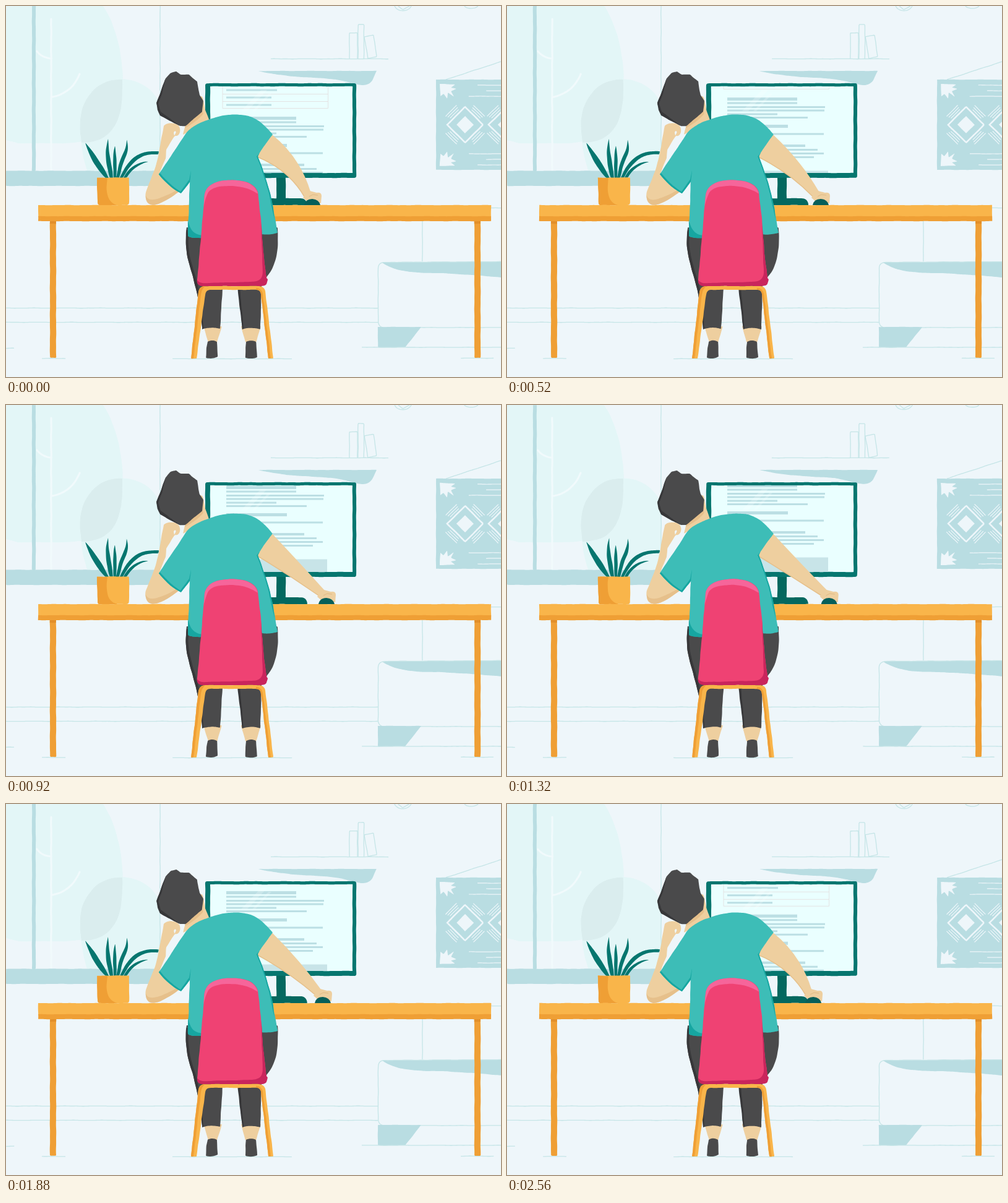
These frames come from a looping animation (800x600 px, 2.6 s). An HTML page:

```html
<!DOCTYPE html>
<html lang="en">
<head>
<meta charset="utf-8">
<title>At the desk</title>
<style>
html, body { margin: 0; width: 100%; height: 100%; overflow: hidden; background: #eef6fa; }
body > svg { display: block; width: 800px; height: 600px; }
.pale { fill: #b9dde2; }
.line { fill: none; stroke: #c5e5e7; stroke-width: 1.3; }
.white { fill: #eef6fa; }
.wline { fill: none; stroke: #eef6fa; stroke-width: 1.2; }
.branch { fill: none; stroke: #f1fafc; stroke-width: 3; stroke-linecap: round; }
.teal { fill: #06766f; }
.stand { fill: #04685f; }
.gold { fill: #f9b54a; }
.amber { fill: #ef9f35; }
.skin { fill: #eecf9f; }
.tan { fill: #e6c08b; }
.dark { fill: #4a4a4b; }
.black { fill: #373739; }
.shirt { fill: #3dbdb7; }
.shade { fill: #16a6a1; }
.pink { fill: #ef4273; }
</style>
</head>
<body>
<svg viewBox="0 0 800 600">
  <rect width="800" height="600" fill="#eef6fa"/>

  <g id="room">
    <path fill="#e3f6f7" d="M0 0H157C180 35 192 90 188 145C185 195 155 222 90 222H20L0 217Z"/>
    <path fill="#e3f6f7" d="M131 266C118 225 116 183 132 149C145 124 180 113 206 121C228 127 242 142 249 160V266Z"/>
    <path fill="#daedee" d="M122 221C116 180 122 160 136 143C148 125 168 118 188 119C189 165 183 188 168 204C158 215 145 220 122 221Z"/>
    <path class="branch" d="M73 21V266"/>
    <path class="branch" d="M50 73Q58 84 73 85"/>
    <path class="branch" d="M119 110C112 127 98 143 75 147"/>
    <path class="pale" d="M42 0H48V267H42Z"/>
    <path class="pale" d="M0 266.500H249V291H0Z"/>
    <path class="line" d="M249 0V267"/>

    <path class="line" d="M428 85.500H618"/>
    <path class="line" d="M555 85V43.500H568V85"/>
    <path class="line" d="M569 85V30H578.500V85"/>
    <path class="line" d="M579 50L594 47L599 82L585 85Z"/>
    <path class="pale" d="M408 105H599L592 120Q587 128 575 128C554 125 545 119 515 117C475 115 440 113 408 105Z"/>
    <path class="line" d="M628 0C632 10 650 10 655 0"/>
    <path class="line" d="M634 0L641 6L652 0"/>
    <path class="line" d="M741 0C745 5 759 5 763 0"/>

    <path class="line" d="M711 119L800 90"/>
    <path class="pale" d="M695 119H802V265H695Z"/>
    <g id="weave"></g>

    <path class="line" d="M784 326.500H800"/>
    <path class="line" d="M673 348V413"/>
    <path class="line" d="M0 488.500H601"/>
    <path class="line" d="M0 511.500H601"/>
    <path class="pale" d="M608 415C640 436 680 430 720 433C755 435 780 437 802 439V413Z"/>
    <path class="line" d="M802 413.500L612 414.500Q601 415 601.500 426V508Q601 520 613 520H802"/>
    <path class="pale" d="M601 519H671L645 552H601Z"/>
    <path class="line" d="M575 552H802"/>
    <path class="line" d="M0 553.500H13"/>
    <path class="line" d="M58 570H96"/>
    <path class="line" d="M269 570.500H462"/>
    <path class="line" d="M735 569.500H788"/>

    <path class="stand" d="M437 276H452V312H437Z"/>
    <path class="stand" d="M420 311H478Q486 312 487 322H420Z"/>
    <path class="teal" d="M325 125H563Q566 125 566 128V275Q566 278 563 278H325Q322 278 322 275V128Q322 125 325 125Z"/>
    <path fill="#eaffff" d="M330 130H560V270H330Z"/>
  </g>

  <svg x="330" y="130" width="230" height="140" viewBox="330 130 230 140">
    <g id="page"></g>
    <path fill="#fff" opacity=".2" d="M380 170L412 136H422L390 170ZM398 170L424 142H429L403 170Z"/>
  </svg>

  <g id="desk">
    <path class="teal" d="M166 278C155 255 141 235 128 221C134 241 144 262 161 278Z"/>
    <path class="teal" d="M173 278C171 255 166 240 165 215C159 235 161 257 168 278Z"/>
    <path class="teal" d="M178 278C179 258 179 242 176 226C172 243 173 260 174 278Z"/>
    <path class="teal" d="M178 278C181 265 181 257 186 246C191 235 195 228 195 216C198 225 198 235 193 245C188 255 186 266 183 278Z"/>
    <path class="teal" d="M184 278C196 250 210 233 247 235L246 240C219 238 203 251 189 278Z"/>
    <path class="teal" d="M190 278C197 263 211 251 230 252C214 256 203 264 195 278Z"/>
    <path class="gold" d="M147 277.500H199V318Q199 322 195 322H151Q148 322 148 318Z"/>
    <path class="amber" d="M147 278H164C161 300 162 317 180 322H151Q148 322 148 318Z"/>
    <path class="amber" d="M71 346H81V569H71Z"/>
    <path class="amber" d="M757 346H767V569H757Z"/>
    <path class="gold" d="M52 322H784V342H52Z"/>
    <path class="amber" d="M52 340H784V348H52Z"/>
    <path fill="#e28f2a" d="M71 348H81V352H71Z"/>
    <path fill="#e28f2a" d="M757 348H767V352H757Z"/>
  </g>

  <path id="arm" class="skin"/>
  <path id="under" fill="none" stroke="#e6c08b" stroke-width="1.500"/>
  <g id="hand">
    <path class="skin" d="M480 310L485 303L491 299L502 302Q510 301 510 307L509 319H490Z"/>
    <path fill="none" stroke="#e0b983" d="M490 308L496 305L504 306"/>
    <path fill="#075f59" d="M482 322Q484 312 495 312Q506 313 508 322Z"/>
  </g>

  <g id="man">
    <path class="skin" d="M255 194C261 187 279 188 281 198C283 205 278 212 273 210L269 216L259 232L258 246L248 270L280 300C266 310 253 319 243 321C231 324 223 313 226 300L239 268C245 252 249 226 252 210Z"/>
    <path class="tan" d="M226 306C230 320 250 312 277 297L280 300C266 310 253 319 243 321C231 324 225 317 226 306Z"/>
    <path fill="#eef6fa" d="M271 205Q273 200 275 204L272 210Z"/>
    <path class="skin" d="M311 148Q318 142 319 152L322 168L328 184L308 196L286 208L290 192Z"/>
    <path class="tan" d="M317 170L290 193L289 197Q308 188 319 174Z"/>
    <path class="dark" d="M275 106L282 111L296 111L300 115L309 122L311 136L313 144L319 153L317 171L290 194L281 194L261 183L250 177L246 168L243 157L249 142L254 127L258 117L266 108Z"/>
    <path class="black" d="M258 117L252 142L246 158L250 171L281 194L261 184L249 177L245 168L243 157L250 139Z"/>

    <path class="skin" d="M319 518H349L341 544H327Z"/>
    <path class="skin" d="M380 518H412L404 544H387Z"/>
    <path class="dark" d="M326 543Q333 539 341 543L342 567Q333 572 323 569L324 553Z"/>
    <path class="dark" d="M388 543Q396 539 404 543L406 568Q397 572 387 569L387 553Z"/>
    <path class="dark" d="M292 358C288 385 293 410 301 434C308 460 315 490 317 523Q332 518 346 522L351 440H374L382 523Q395 518 411 523L413 452L422 437C437 420 441 395 439 358Z"/>
    <path class="black" d="M292 362C288 385 293 410 301 434C308 460 315 490 317 523L319 522C317 485 311 450 304 430C296 405 293 385 295 362Z"/>
    <path class="black" d="M374 455L382 523L384 522L378 455Z"/>

    <path class="shirt" d="M290 207C298 196 312 189 327 184C345 176 375 173 392 178C410 183 421 197 431 208Q418 225 406 243C417 268 427 300 432 328L439 367Q425 371 411 369L320 375Q300 376 294 372L297 284L283 303Q262 292 247 272C258 255 272 235 290 207Z"/>
    <path class="shade" d="M247 272Q262 292 283 303L297 285L299 265L296 281L282 300Q264 289 249 270Z"/>
    <path class="shade" d="M294 345C297 362 304 371 320 371L319 375Q300 376 294 372Z"/>
    <path class="shade" d="M405 243C415 268 424 295 429 323L434 345L432 326C427 299 417 268 407 243L410 237Z"/>

    <path class="pink" d="M321 305Q325 283 362 281.500Q401 281 407 302L412 345L416 400L421 440V448Q420 452 410 452H317Q308 451 309 442L315 375Z"/>
    <path fill="#f6659a" d="M319 325L321 305Q325 283 362 281.500Q401 281 407 304Q386 290 359 291Q331 292 326 303Q321 315 319 325Z"/>
    <path fill="#c9255c" d="M412 349L416 400L421 440L423 442L421 449Q420 453 410 453H317Q308 452 309 443Q313 449 324 448L399 446Q414 445 415 431Z"/>
    <path class="gold" d="M311 462Q313 453 322 453H408Q417 453 419 461L432 570H424L412 466Q411 459 404 459H330Q323 459 322 466L308 570H299Z"/>
    <path class="amber" d="M311 462Q313 453 322 453Q316 458 315 466L303 570H299Z"/>
    <path class="amber" d="M404 456Q413 456 415 466L428 570H424L412 466Q411 459 404 459Z"/>
  </g>
</svg>

<script>
const LOOP = 2600, STEP = 40;
const $ = id => document.getElementById(id);

// wall hanging
const diamond = (x, r) => `M${x - r} 192L${x} ${192 - r}L${x + r} 192L${x} ${192 + r}Z`;
const path = (cls, d, more = '') => `<path class="${cls}" d="${d}" ${more}/>`;
let weave = '';
const corner = [[701, 126], [726, 127], [719, 132], [728, 134], [719, 138], [724, 147],
  [714, 140], [713, 150], [707, 142], [702, 146]];
for (const flip of [0, 1]) {
  const y = v => flip ? 385 - v : v;
  weave += path('white', 'M' + corner.map(p => p[0] + ' ' + y(p[1])).join('L') + 'Z');
  for (const [x, v] of [[762, 128], [776, 137], [748, 146]])
    weave += path('wline', `M${x} ${y(v)}H802`);
}
for (const x of [742, 809]) {
  weave += path('wline', diamond(x, 29), 'style="stroke-width:2.5"') + path('white', diamond(x, 14));
  // short strokes beside each edge of the diamond
  for (const r of [35, 40, 45])
    for (const sx of [-1, 1])
      for (const sy of [-1, 1]) {
        const at = u => `${x + sx * r * u} ${192 + sy * r * (1 - u)}`;
        weave += path('wline', `M${at(.3)}L${at(.7)}`);
      }
}
$('weave').innerHTML = weave;

// scrolling page: [y, right end, height]
const bars = [[136, 438, 3], [148, 429, 3], [160, 429, 3], [181.5, 469, 5], [188, 469, 3],
  [194.5, 514, 3], [200, 513, 3], [206, 437, 3], [211.5, 486, 3], [225.5, 454, 5],
  [238, 512, 3], [257, 482, 4], [263.5, 502, 3], [269.5, 512, 3], [275.5, 496, 3]];
$('page').innerHTML =
  bars.map(([y, x, h]) => `<rect x="356" y="${y - h / 2}" width="${x - 356}" height="${h}" fill="#bcdfe4"/>`).join('') +
  '<rect x="356" y="297.5" width="163" height="60" fill="#c8e4e8"/>' +
  '<path fill="none" stroke="#e3dcdc" stroke-width=".8" d="M350 120H520.5V165.5H350ZM350 142.5H520.5M350 154.5H520.5"/>';

// hand-drawn edges: sample every path once, then shift the points a little
const rough = ['room', 'desk', 'man'].flatMap(id => [...$(id).querySelectorAll('path')]).map(el => {
  const len = el.getTotalLength(), n = Math.ceil(len / 2), pts = [];
  for (let i = 0; i <= n; i++) {
    const p = el.getPointAtLength(len * i / n);
    pts.push([p.x, p.y]);
  }
  return { el, pts, end: /Z$/.test(el.getAttribute('d')) ? 'Z' : '' };
});

function wobble(k) {
  const a = k * 2.4, b = k * 4.1;
  for (const { el, pts, end } of rough) {
    el.setAttribute('d', 'M' + pts.map(([x, y]) => {
      const dx = .16 * Math.sin(y * .13 + x * .03 + a) + .1 * Math.sin(y * .31 - x * .07 + b);
      const dy = .16 * Math.sin(x * .12 - y * .04 + b) + .1 * Math.sin(x * .29 + y * .06 + a);
      return (x + dx).toFixed(2) + ' ' + (y + dy).toFixed(2);
    }).join('L') + end);
  }
}

// monotone curve through [time, value] keys, level at both ends
function curve(keys) {
  const slope = i => (keys[i + 1][1] - keys[i][1]) / (keys[i + 1][0] - keys[i][0]);
  const tan = keys.map((_, i) => {
    if (!i || i === keys.length - 1) return 0;
    const p = slope(i - 1), q = slope(i);
    return p * q > 0 ? 2 * p * q / (p + q) : 0;
  });
  return t => {
    let i = 0;
    while (i < keys.length - 2 && t >= keys[i + 1][0]) i++;
    const [t0, v0] = keys[i], [t1, v1] = keys[i + 1], d = t1 - t0, u = (t - t0) / d, w = 1 - u;
    return v0 * (1 + 2 * u) * w * w + v1 * u * u * (3 - 2 * u) +
      d * u * w * (tan[i] * w - tan[i + 1] * u);
  };
}
const scroll = curve([[0, 0], [520, 31], [920, 48], [1320, 51], [1880, 38], [2160, 19.5], [2600, 0]]);
const reach = curve([[0, 0], [520, 12], [920, 23], [1320, 25.7], [1880, 17], [2160, 9.5], [2600, 0]]);

function draw(t) {
  const h = reach(t);
  $('page').setAttribute('transform', `translate(0 ${-scroll(t)})`);
  $('hand').setAttribute('transform', `translate(${h} 0)`);
  const low = `${482 + h} 308Q456 ${264 + .42 * h} 406 244`;
  $('arm').setAttribute('d', `M424 205L430 208Q475 ${244 + .5 * h} ${492 + h} 300L${low}Z`);
  $('under').setAttribute('d', 'M' + low);
}

const start = performance.now();
let last = -1, phase = -1;
function frame() {
  const n = Math.floor((performance.now() - start) % LOOP / STEP);
  if (n !== last) {
    last = n;
    draw(n * STEP);
    if (n >> 1 !== phase) wobble(phase = n >> 1);
  }
  requestAnimationFrame(frame);
}
frame();
</script>
</body>
</html>
```
